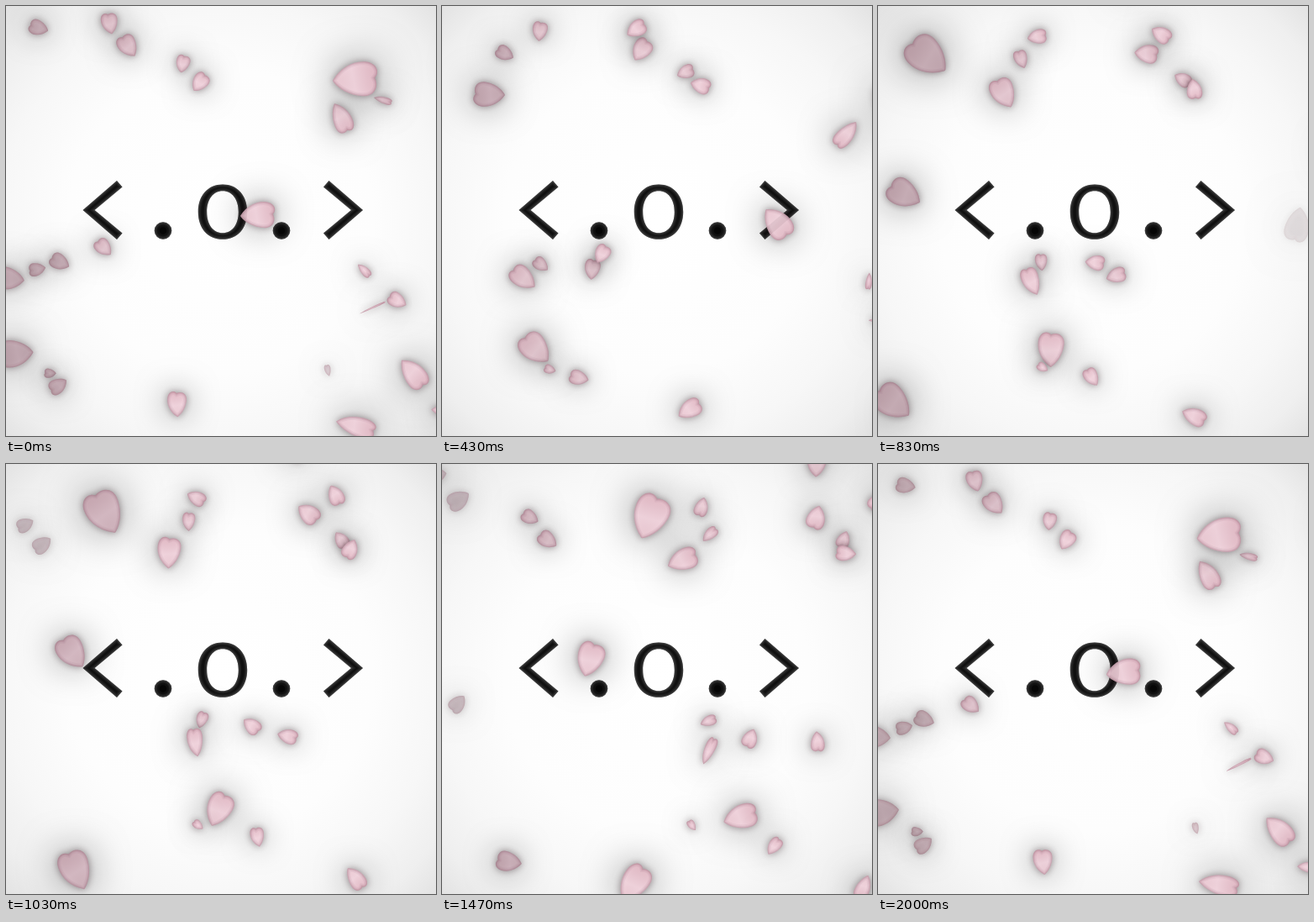
These frames come from a looping animation (512x512 px, 2.03 s). An HTML page with a canvas:

```html
<!DOCTYPE html>
<html lang="en">
<head>
<meta charset="utf-8">
<title>Drifting petals</title>
<style>
html, body { margin: 0; width: 100%; height: 100%; overflow: hidden; background: #fff; }
canvas { display: block; width: 512px; height: 512px; }
</style>
</head>
<body>
<canvas id="stage" width="512" height="512" role="img" aria-label="&lt;.o.&gt;"></canvas>
<script>
const ctx = document.getElementById('stage').getContext('2d');
const LOOP = 2030, STEPS = 61, FADE = 12;
const clamp = (v, lo = 0, hi = 1) => Math.min(hi, Math.max(lo, v));
const petals = [];

// size: length; thin: width ratio at the end of life; angle and spin in degrees (per step);
// path: a few waypoints of step, x, y, from birth to death.
function petal(size, thin, angle, spin, ...path) {
  petals.push({ size, thin, angle, spin, path, born: path[0][0], dies: path[path.length - 1][0] });
}

// Upper drift
petal(28, .8, -145, 5.2, [38, -25, 42], [74, 237, 52], [131, 610, 76]);
petal(25, .68, -125, 5.3, [38, -50, 12], [74, 231, 27], [118, 652, 54]);
petal(23, .65, -132, 6.1, [50, -25, 26], [74, 116, 30], [119, 401, 67]);
petal(22, 0, -98, 3.4, [0, -30, 55], [38, 272, 76], [84, 622, 165]);
petal(21, .72, -135, 4.3, [25, -15, 82], [50, 142, 64], [86, 363, 87], [127, 612, 60]);
petal(24, .72, -150, 5.4, [25, 5, 101], [50, 163, 90], [86, 377, 99], [129, 600, 112]);
petal(37, .35, -145, 5, [0, -50, 117], [38, 244, 109], [61, 400, 133], [95, 604, 192]);
petal(53, .75, -88, 3.8, [13, -50, 74], [38, 186, 59], [61, 416, 86], [82, 600, 140]);
petal(28, .8, -36, 2, [20, 260, -24], [38, 398, -7], [66, 625, 40]);
// Middle drift
petal(41, .7, -102, 4.1, [13, -70, 232], [38, 131, 228], [61, 300, 248], [88, 518, 260]);
petal(24, .6, -115, 5.4, [50, -34, 298], [80, 231, 317], [125, 618, 340]);
petal(23, .75, -165, 5.6, [38, -15, 287], [74, 190, 295], [111, 402, 335], [147, 612, 392]);
petal(20, .2, -135, 3.8, [50, -28, 320], [86, 194, 305], [111, 356, 308], [152, 610, 355]);
petal(34, -.55, -100, 2.3, [50, -72, 331], [86, 182, 328], [111, 360, 347], [148, 610, 392]);
// Lower drift
petal(41, .55, -128, 3.8, [50, -68, 426], [86, 205, 409], [111, 402, 425], [139, 606, 460]);
petal(14, .5, -95, 1.2, [50, -14, 443], [99, 266, 430], [128, 412, 436]);
petal(23, .45, -155, 3.6, [50, -24, 467], [86, 254, 442], [135, 610, 512]);
petal(30, .45, -132, 4.6, [31, -18, 482], [61, 203, 474], [99, 463, 499], [124, 622, 520]);
petal(48, .2, -92, 4.2, [13, -104, 440], [38, 160, 494], [61, 417, 500], [81, 615, 475]);

// Polynomial through all waypoints; n picks the coordinate.
function along(path, t, n) {
  return path.reduce((sum, p) => sum + path.reduce(
    (w, q) => q === p ? w : w * (t - q[0]) / (p[0] - q[0]), p[n]), 0);
}

const outline = new Path2D(
  'M.16,.98C-.5,.72 -1,.2 -1,-.38C-1,-.88 -.5,-1.1 -.1,-.87' +
  'C.3,-1.08 1,-.98 1,-.36C1,.2 .7,.7 .3,.98Q.22,1.03 .16,.98Z');

const mix = (a, b, k) => 'rgb(' + a.map((v, i) => Math.round(v + (b[i] - v) * k)) + ')';

// Soft edge inside a shape, from [width, strength] layers.
function rim(shape, color, alpha, layers) {
  ctx.save();
  ctx.clip(shape, 'evenodd');
  ctx.strokeStyle = color;
  for (const [width, strength] of layers) {
    ctx.globalAlpha = alpha * strength;
    ctx.lineWidth = width;
    ctx.stroke(shape);
  }
  ctx.restore();
}

// Only the shadow lands on the stage.
function halo(shape, color, blur) {
  ctx.save();
  ctx.translate(-2000, 0);
  ctx.shadowOffsetX = 2000;
  ctx.shadowColor = color;
  ctx.shadowBlur = blur;
  ctx.fill(shape);
  ctx.restore();
}

function drawPetal(p, t) {
  const age = t - p.born, life = age / (p.dies - p.born);
  const alpha = clamp(age / FADE) * clamp((p.dies - t) / FADE);
  const glow = clamp(age / 30) * clamp((p.dies - t) / FADE);
  const ratio = Math.max(.06, Math.abs(.8 + (p.thin - .8) * life * life));
  const turn = new DOMMatrix().translate(along(p.path, t, 1), along(p.path, t, 2))
    .rotate(p.angle + p.spin * age).scale(p.size * ratio / 2, p.size / 2);
  const shape = new Path2D();
  shape.addPath(outline, turn);

  ctx.save();
  ctx.globalAlpha = alpha;
  halo(shape, 'rgba(0,0,0,.5)', 22 + p.size * .5);
  halo(shape, 'rgba(40,20,26,.45)', 9);

  const top = turn.transformPoint({ x: -.4, y: -1 });
  const tip = turn.transformPoint({ x: .3, y: 1 });
  const fill = ctx.createLinearGradient(top.x, top.y, tip.x, tip.y);
  fill.addColorStop(0, mix([160, 138, 146], [234, 188, 201], glow));
  fill.addColorStop(.55, mix([176, 150, 159], [254, 222, 232], glow));
  fill.addColorStop(1, mix([164, 140, 149], [244, 206, 217], glow));
  ctx.globalAlpha = alpha * .86;
  ctx.fillStyle = fill;
  ctx.fill(shape);
  ctx.restore();
  rim(shape, 'rgb(130,84,98)', alpha, [[8, .08], [5, .1], [3, .13], [1.4, .14]]);
}

function drawBackdrop() {
  const g = ctx.createRadialGradient(256, 256, 0, 256, 256, 364);
  g.addColorStop(0, '#fff');
  g.addColorStop(.5, '#fdfdfd');
  g.addColorStop(.72, '#f7f7f7');
  g.addColorStop(.88, '#efefef');
  g.addColorStop(1, '#e2e2e2');
  ctx.fillStyle = g;
  ctx.fillRect(0, 0, 512, 512);
}

// Rounded ring half, slightly squarer than an ellipse.
function oval(path, cx, cy, rx, ry) {
  const kx = rx * .6, ky = ry * .6;
  path.moveTo(cx, cy - ry);
  path.bezierCurveTo(cx + kx, cy - ry, cx + rx, cy - ky, cx + rx, cy);
  path.bezierCurveTo(cx + rx, cy + ky, cx + kx, cy + ry, cx, cy + ry);
  path.bezierCurveTo(cx - kx, cy + ry, cx - rx, cy + ky, cx - rx, cy);
  path.bezierCurveTo(cx - rx, cy - ky, cx - kx, cy - ry, cx, cy - ry);
  path.closePath();
}

function makeFace() {
  const path = new Path2D();
  for (const [tip, side] of [[91.5, 1], [425, -1]]) {
    const at = (dx, dy) => path.lineTo(tip + side * dx, 243 + dy);
    path.moveTo(tip, 243);
    at(40.5, -35);
    at(47, -27.5);
    at(14, 0);
    at(47, 27.5);
    at(40.5, 35);
    path.closePath();
  }
  oval(path, 258, 245.2, 29.2, 32.6);
  oval(path, 258, 245.2, 18.8, 25);
  for (const x of [187, 328]) {
    path.moveTo(x + 10.3, 267.5);
    path.arc(x, 267.5, 10.3, 0, 2 * Math.PI);
  }
  return path;
}
const face = makeFace();

function drawFace() {
  ctx.fillStyle = '#060606';
  ctx.fill(face, 'evenodd');
  rim(face, '#aaa', 1, [[12, .06], [7, .08], [4, .1], [2, .14]]);
}

function draw(step) {
  drawBackdrop();
  drawFace();
  for (const p of petals) {
    for (let t = step; t < p.dies; t += STEPS) {
      if (t > p.born) drawPetal(p, t);
    }
  }
}

const began = performance.now();
let shown = -1;
function tick() {
  const ms = (performance.now() - began) % LOOP;
  const step = Math.floor((Math.floor(ms / 10) + .5) * .3);
  if (step !== shown) draw(shown = step);
  requestAnimationFrame(tick);
}
tick();
</script>
</body>
</html>
```
